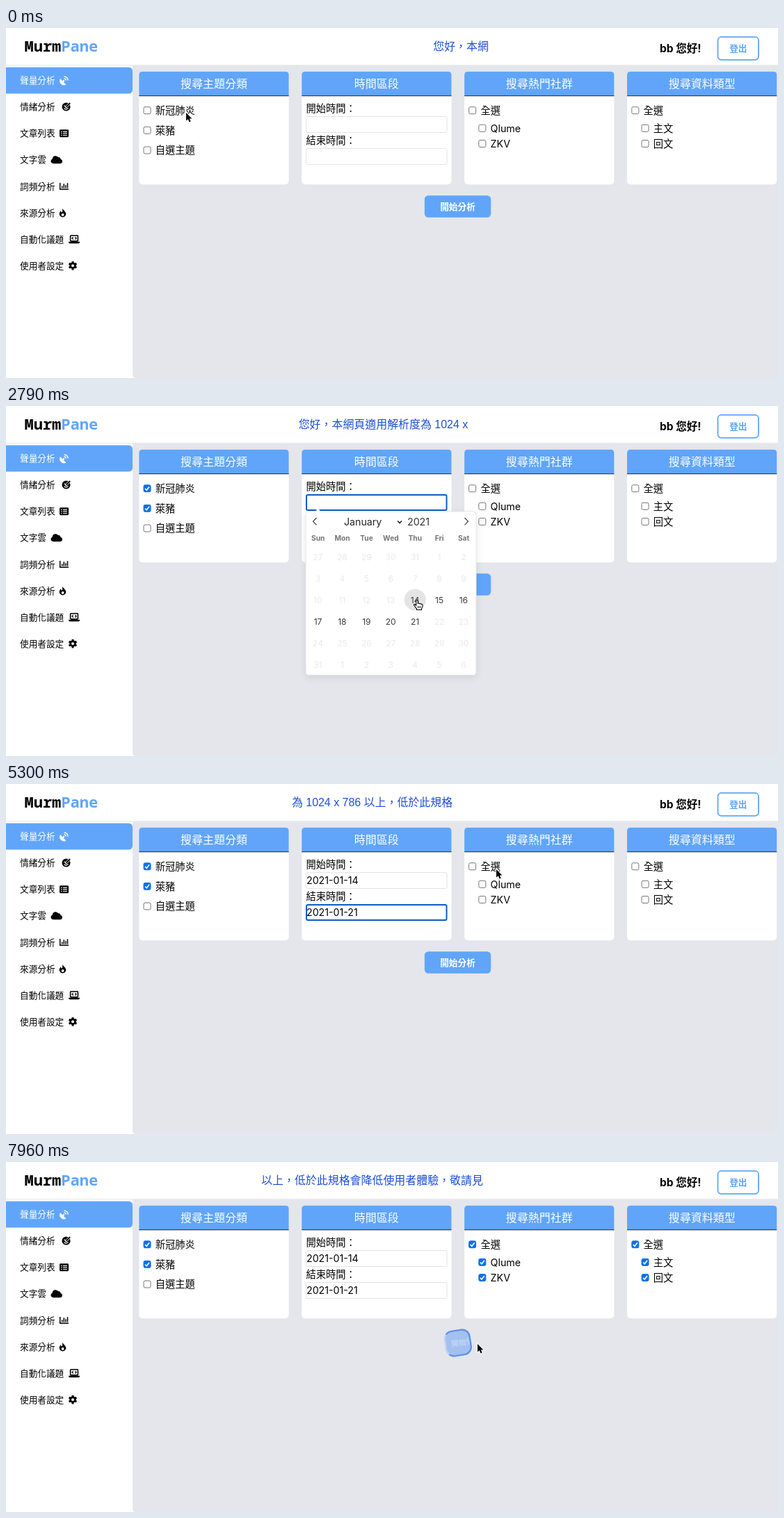
An HTML page for the animation above (8000 ms loop, 1110 by 504 pixels).

```html
<!DOCTYPE html>
<html lang="zh-Hant">
<head>
<meta charset="utf-8">
<title>聲量分析</title>
<style>
html, body { margin: 0; width: 100%; height: 100%; overflow: hidden; background: #e4e6eb; }
svg { display: block; width: 1110px; height: 504px; font-family: Inter, "Noto Sans CJK TC", "Noto Sans CJK", sans-serif; text-spacing-trim: space-all; }
.mono { font-family: "Noto Sans Mono", "DejaVu Sans Mono", monospace; }
.notice { font-family: "Liberation Sans", "Noto Sans CJK TC", "Noto Sans CJK", sans-serif; }
</style>
</head>
<body>
<svg viewBox="0 0 1110 504" xmlns="http://www.w3.org/2000/svg">
  <defs>
    <filter id="shadow" x="-10%" y="-10%" width="120%" height="120%">
      <feDropShadow dx="0" dy="2.6" stdDeviation="5" flood-color="#000" flood-opacity=".1"/>
    </filter>
    <clipPath id="loaderClip"><rect x="-18" y="-18" width="36" height="36" rx="11"/></clipPath>
  </defs>
  <g id="page"></g>
  <g id="live"></g>
</svg>
<script>
const LOOP = 8000, FRAME = 147.3;
const BLUE = '#60a5fa', INK = '#000';
const page = document.getElementById('page');
const live = document.getElementById('live');

const attrs = o => Object.entries(o).map(([k, v]) => `${k}="${v}"`).join(' ');
const rect = (x, y, width, height, fill, more = {}) =>
  `<rect ${attrs({ x, y, width, height, fill, ...more })}/>`;
const path = (d, more = {}) => `<path ${attrs({ d, ...more })}/>`;
const line = (d, stroke, width, more = {}) =>
  path(d, { fill: 'none', stroke, 'stroke-width': width, ...more });
// Text is placed by the vertical centre of its glyphs.
const text = (x, cy, s, size, fill = INK, more = {}) =>
  `<text ${attrs({ x, y: (cy + size * .37).toFixed(2), 'font-size': size, fill, ...more })}>${s}</text>`;
const MID = { 'text-anchor': 'middle' };
const BOLD = { 'font-weight': 700 };

/* ---------- static page ---------- */

const icons = {
  dish: path('M-5.5-2.5A6.2 6.2 0 0 0 3 6L-.8 2.2 1 .4-.4-1-2.2.8Z') +
    line('M0-5.6A5.6 5.6 0 0 1 5.6 0M0-2.7A2.7 2.7 0 0 1 2.7 0', 'currentColor', 1.5),
  mood: '<circle r="6"/>' + line('M-3 2.2Q0 5 3 1.6M-3-1.5h1.6M2-1.5h1.4', '#fff', 1.2) +
    line('M-1 1L6-6', '#fff', 3.4) + line('M0 0L5.6-5.6', 'currentColor', 2),
  list: rect(-6.5, -5.5, 13, 11, 'currentColor', { rx: 1.4 }) +
    line('M-4.6-2.4h1.6M-1.6-2.4h6M-4.6.2h1.6M-1.6.2h6M-4.6 2.8h1.6M-1.6 2.8h6', '#fff', 1.2),
  cloud: path('M-5 5.5A3.6 3.6 0 0 1-5.8-1.4A4.6 4.6 0 0 1 2.6-3.6A2.7 2.7 0 0 1 6-.8A3.2 3.2 0 0 1 5 5.5Z'),
  chart: line('M-5.8-5V4.3H6.5', 'currentColor', 1.5) +
    line('M-2.8 2.6V-.4M-.2 2.6V-3.6M2.4 2.6V-1.6M5 2.6V-4.6', 'currentColor', 1.5),
  fire: path('M-.2-6.3C.6-3.6 4.8-1.6 4.8 1.8A4.8 4.6 0 0 1-4.8 1.8C-4.8-.4-3.6-1.8-2.6-2.8C-2.3-1.2-1.8-.6-1-.4C0-1.8-.6-4.2-.2-6.3Z') +
    path('M0 5C-2.6 4.6-2.2 2.4-.4.8C.2 1.8 1 1.6 1.4 1C2.6 3 2 4.8 0 5Z', { fill: '#fff' }),
  laptop: rect(-5.4, -5.4, 10.8, 8.2, 'none', { rx: .8, stroke: 'currentColor', 'stroke-width': 1.6 }) +
    path('M-8 3.6H8V4.4Q8 6.2 6.2 6.2H-6.2Q-8 6.2-8 4.4Z') +
    line('M-1.2 -3.2L-3 -1.4L-1.2 .4M1.2 -3.2L3 -1.4L1.2 .4', 'currentColor', 1.2),
  gear: '<circle r="3.4" fill="none" stroke="currentColor" stroke-width="2.8"/>' +
    [0, 60, 120].map(a => line('M0-6.2V-4M0 4V6.2', 'currentColor', 3, { transform: `rotate(${a})` })).join('')
};

const menu = [
  ['聲量分析', 'dish', 83.5], ['情緒分析', 'mood', 86.5], ['文章列表', 'list', 83.5],
  ['文字雲', 'cloud', 72.5], ['詞頻分析', 'chart', 83.5], ['來源分析', 'fire', 81.5],
  ['自動化議題', 'laptop', 98], ['使用者設定', 'gear', 96]
];

function menuItem([label, icon, x], i) {
  const y = 75.5 + 38.1 * i, color = i ? INK : '#fff';
  return text(20, y, label, 12.65, color, { 'font-weight': 500 }) +
    `<g transform="translate(${x} ${y})" fill="${color}" color="${color}">${icons[icon]}</g>`;
}

function card(title, i) {
  const x = 191.3 + 233.9 * i, w = 215.3;
  return rect(x, 62.7, w, 162.5, '#fff', { rx: 5 }) +
    path(`M${x} 98V67.7q0-5 5-5h${w - 10}q5 0 5 5V98z`, { fill: BLUE }) +
    rect(x, 97.2, w, 1, '#1f2937') +
    text(x + w / 2, 80.5, title, 16, '#fff', MID);
}

// [checkbox x, centre y, label, time it gets ticked]
const options = [
  [203, 118.7, '新冠肺炎', 580], [203, 147.3, '萊豬', 1300], [203, 176, '自選主題', Infinity],
  [670.6, 118.7, '全選', 5430], [684.8, 144.3, 'Qlume', 5430], [684.8, 166.5, 'ZKV', 5430],
  [904.8, 118.7, '全選', 6310], [919, 144.3, '主文', 6310], [919, 166.5, '回文', 6310]
];

page.innerHTML =
  rect(0, 0, 1110, 504, '#e4e6eb') +
  path('M0 54H182V499q0 5 5 5H0z', { fill: '#fff' }) +
  rect(0, 0, 1110, 53, '#fff') + rect(0, 53, 1110, 1.2, '#e8e9ec') +
  `<text class="mono" x="26.5" y="34" font-size="22" font-weight="700">Murm<tspan fill="${BLUE}" font-weight="600">Pane</tspan></text>` +
  text(940, 29.5, 'bb 您好!', 15.5, INK, BOLD) +
  rect(1023.5, 12.8, 58.5, 33, '#fff', { rx: 5, stroke: BLUE, 'stroke-width': 1.8 }) +
  text(1052.8, 29.5, '登出', 12.65, BLUE, { ...MID, ...BOLD }) +
  path('M0 56.5H176q6 0 6 6V88.5q0 6-6 6H0z', { fill: BLUE }) +
  menu.map(menuItem).join('') +
  ['搜尋主題分類', '時間區段', '搜尋熱門社群', '搜尋資料類型'].map(card).join('') +
  options.map(([x, y, label]) => text(x + 11.8, y, label, 14.25)).join('') +
  text(431.5, 115.5, '開始時間：', 14.25) + text(431.5, 161.5, '結束時間：', 14.25);

/* ---------- moving parts ---------- */

const NOTICE = '您好，本網頁適用解析度為 1024 x 786 以上，低於此規格會降低使用者體驗，敬請見諒';
const LEAD = 16, WINDOW = 21, NOTICE_SIZE = 15.95;

// A window of characters slides over the notice; wide blanks come first.
function notice(frame) {
  const first = Math.min(39, Math.floor(.27 + .75 * frame)) - LEAD;
  const blanks = Math.max(0, -first);
  const shown = NOTICE.slice(Math.max(0, first), first + WINDOW).trim();
  return text(526.5 + blanks * NOTICE_SIZE / 2, 26.2, shown, NOTICE_SIZE, '#1d4ed8', { ...MID, class: 'notice' });
}

function checkbox([x, y, , tickAt], t) {
  const box = (fill, stroke) => rect(x - 5, y - 5, 10, 10, fill, { rx: 2, stroke });
  return t < tickAt
    ? box('#fff', '#767676')
    : box('#0a70ee', '#0a70ee') + line(`M${x - 3} ${y + .2}l2.2 2.3 3.8-5`, '#fff', 1.6);
}

const pickers = [
  { y: 127, open: 2000, pick: 3080, blur: 3600, value: '2021-01-14',
    monthX: 486, chevronX: 563, yearX: 577, yearColor: '#333', nav: true },
  { y: 173, open: 3600, pick: 4550, blur: 5430, value: '2021-01-21',
    monthX: 497, chevronX: 554, yearX: 567, yearColor: '#888', nav: false }
];

function field(p, t) {
  const focused = t >= p.open && t < p.blur;
  const box = focused
    ? rect(432, p.y + 1, 201.5, 22, '#fff', { rx: 2, stroke: '#0b5cc0', 'stroke-width': 2 })
    : rect(431.5, p.y + .5, 202.5, 23, '#fff', { rx: 2.5, stroke: '#e1e3e8' });
  return box + (t >= p.pick ? text(432, p.y + 11.8, p.value, 14.2) : '');
}

const isOpen = (p, t) => t >= p.open && t < p.pick;
const cell = (p, i) => ({ x: 448.5 + 34.9 * (i % 7), y: p.y + 91 + 31 * Math.floor(i / 7) });
const enabled = i => i >= 18 && i <= 25;

function hoveredDay(p, pos) {
  for (let i = 18; i <= 25; i++) {
    const c = cell(p, i);
    if (Math.hypot(pos.x - c.x, pos.y - c.y) < 15.5) return i;
  }
  return -1;
}

function calendar(p, t, hover) {
  const y = p.y + 25, top = p.y + 40;
  const grow = 1 - (1 - Math.min(1, (t - p.open) / 270)) ** 3;
  let s = rect(431, y, 245, 235.5, '#fff', { rx: 4.5, stroke: '#e6e6e6', filter: 'url(#shadow)' }) +
    path(`M444 ${y + .5}l4.5-5 4.5 5z`, { fill: '#fff' }) +
    text(p.monthX, top, 'January', 14.2, '#222') +
    line(`M${p.chevronX} ${top - 1.5}l3 3 3-3`, '#222', 1.6) +
    text(p.yearX, top, '2021', 14.2, p.yearColor);
  if (p.nav) s += line(`M446.5 ${top - 6}l-5 5.2 5 5.2M659.5 ${top - 6}l5 5.2-5 5.2`, '#333', 1.1);
  ['Sun', 'Mon', 'Tue', 'Wed', 'Thu', 'Fri', 'Sat'].forEach((d, i) => {
    s += text(448.7 + 34.9 * i, p.y + 63, d, 10.2, '#757575', { ...MID, ...BOLD });
  });
  for (let i = 0; i < 42; i++) {
    const c = cell(p, i);
    const day = i < 5 ? 27 + i : (i - 5) % 31 + 1;
    if (i === hover) s += `<circle cx="${c.x}" cy="${c.y - 1}" r="15.5" fill="#e4e4e4"/>`;
    s += text(c.x, c.y, day, 12, enabled(i) ? '#393939' : '#e9e9e9', MID);
  }
  return `<g opacity="${grow}" transform="translate(0 ${-18 * (1 - grow)})">${s}</g>`;
}

// The button shrinks into a small spinner once it is pressed.
function button(t) {
  if (t < 7500) {
    return rect(601.8, 241.2, 95.4, 31.6, BLUE, { rx: 5.5 }) +
      text(649.5, 257.3, '開始分析', 12.7, '#fff', { ...MID, ...BOLD });
  }
  if (t < 7640) {
    return rect(620, 241.5, 59, 36, '#84b2f6', { rx: 9 }) +
      text(649.5, 259.5, '開始分析', 12.2, '#c6dbfa', { ...MID, ...BOLD });
  }
  const angle = t < 7940 ? -2 : -9;
  return `<g transform="translate(649.8 260.5) rotate(${angle})">` +
    rect(-18, -18, 36, 36, '#a4c0f0', { rx: 11 }) +
    `<g clip-path="url(#loaderClip)">${text(-9.5, 0, '開始分析', 10.5, '#c2d6f7', BOLD)}</g>` +
    line('M-18 7V-7A11 11 0 0 1-15-14.5M-18 7A11 11 0 0 0-15 14.5', '#bfd3f4', 2.4) +
    line('M-15-14.5A11 11 0 0 1-7-18H7A11 11 0 0 1 18-7V7A11 11 0 0 1 7 18H-7A11 11 0 0 1-15 14.5', '#5f92e8', 2.4) +
    '</g>';
}

const route = [
  [0, 259, 122], [300, 240, 121], [600, 236, 121], [1000, 230, 152], [1330, 230, 152],
  [1760, 519, 137], [2060, 519, 137], [2650, 591, 279], [3090, 591, 279],
  [3480, 552, 184], [3700, 552, 184], [4200, 597, 361], [4500, 597, 361],
  [4710, 714, 150], [5000, 705, 123], [5460, 705, 123], [5900, 855, 126],
  [6190, 950, 122], [6340, 950, 122], [6770, 722, 215], [6920, 705, 233],
  [7070, 686, 257], [7220, 678, 262]
];

function pointerAt(t) {
  const n = route.findIndex(p => p[0] > t);
  if (n < 0) return { x: 678, y: 262 };
  const [t0, x0, y0] = route[n - 1], [t1, x1, y1] = route[n];
  const u = (t - t0) / (t1 - t0), e = u * u * (3 - 2 * u);
  return { x: x0 + (x1 - x0) * e, y: y0 + (y1 - y0) * e };
}

const overButton = (pos, t) =>
  t < 7500 && pos.x > 602 && pos.x < 697 && pos.y > 241 && pos.y < 273;

function pointer(pos, hand) {
  const shape = hand
    ? path('M-1.3 1.2Q0-.6 1.3 1.2V5.4Q2.7 4.5 3.7 5.7Q5 5.1 5.8 6.4Q8 6 8 8.2Q8 11 6.5 13V14.5H-.5V13Q-2.4 11-4.5 7.7Q-4.4 5.9-2.6 7L-1.3 8.2Z',
        { fill: '#fff', stroke: '#000', 'stroke-width': 1.1 }) +
      line('M1.4 9v3M3.2 9v3M5 9v3', '#000', .8)
    : path('M0 0V11.6L2.7 9.2 4.6 13.5 6.6 12.6 4.8 8.4H8.4Z',
        { fill: '#000', stroke: '#fff', 'stroke-width': 1.6, 'paint-order': 'stroke' });
  return `<g transform="translate(${pos.x.toFixed(1)} ${pos.y.toFixed(1)})">${shape}</g>`;
}

function render(frame) {
  const t = frame * FRAME, pos = pointerAt(t);
  const picker = pickers.find(p => isOpen(p, t));
  const hover = picker ? hoveredDay(picker, pos) : -1;
  live.innerHTML = notice(frame) +
    options.map(o => checkbox(o, t)).join('') +
    pickers.map(p => field(p, t)).join('') +
    button(t) +
    (picker ? calendar(picker, t, hover) : '') +
    pointer(pos, hover >= 0 || (!picker && overButton(pos, t)));
}

const start = performance.now();
let shown = -1;
function tick() {
  const t = (performance.now() - start) % LOOP;
  const frame = Math.floor((t + 25) / FRAME);
  if (frame !== shown) render(shown = frame);
  requestAnimationFrame(tick);
}
tick();
</script>
</body>
</html>
```
